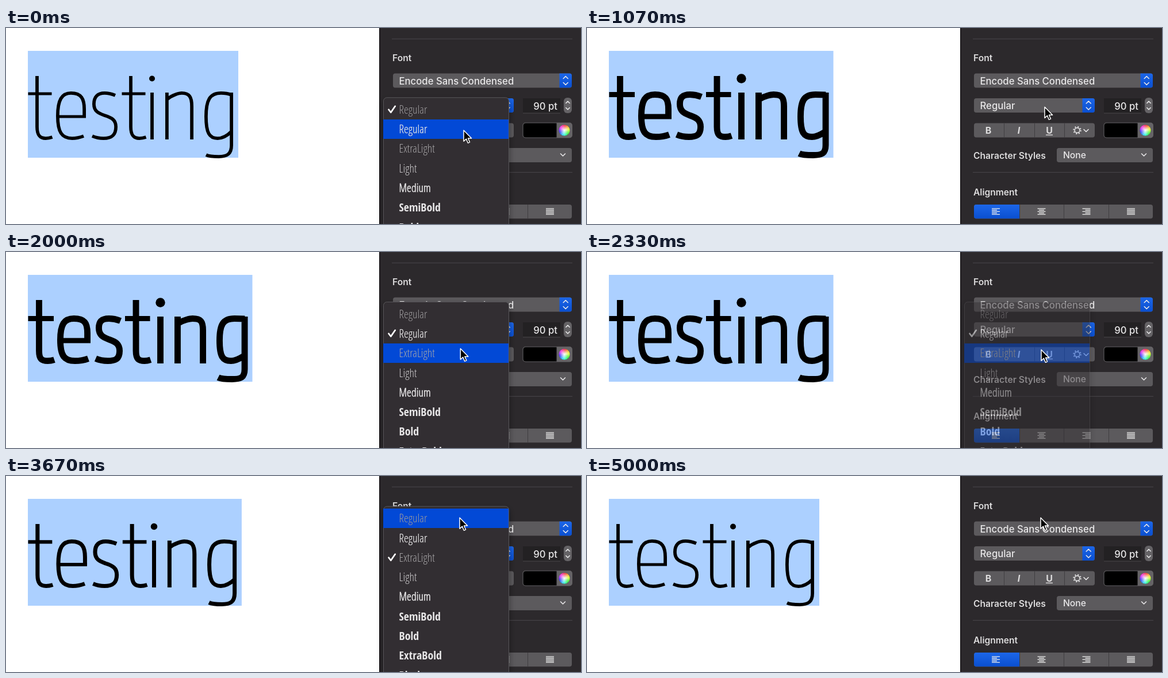
An HTML page that plays this animation: 1000x343 px, repeating every 5070 ms.

```html
<!DOCTYPE html>
<html lang="en">
<head>
<meta charset="utf-8">
<title>Font weight menu</title>
<style>
  html, body { margin: 0; width: 100%; height: 100%; overflow: hidden; background: #fff; }
  svg { display: block; width: 100%; height: 100%; }
  text { font-family: Inter, Roboto, sans-serif; font-size: 16.7px; font-weight: 500; fill: #e9e8e9; }
  .label { font-size: 15.6px; font-weight: 600; fill: #dddcdd; }
  .bold { font-size: 16px; font-weight: 700; text-anchor: middle; fill: #dddcdd; }
  .menu text { font-size: inherit; font-weight: inherit; fill: inherit; }
  .light text { font-family: "Open Sans Condensed Light", "Noto Sans", "Open Sans", sans-serif; font-stretch: 75%; }
  .heavy text { font-family: "Open Sans Condensed", "Open Sans", "Noto Sans", sans-serif; font-stretch: 75%; }
</style>
</head>
<body>
<svg id="stage" viewBox="0 0 1000 343" preserveAspectRatio="none">
  <defs>
    <linearGradient id="blue" x2="0" y2="1">
      <stop stop-color="#1c66e8"/><stop offset="1" stop-color="#0a4fd0"/>
    </linearGradient>
    <radialGradient id="glow">
      <stop stop-color="#fff"/><stop offset="1" stop-color="#fff" stop-opacity="0"/>
    </radialGradient>
    <filter id="shadow" x="-10%" y="-10%" width="120%" height="120%">
      <feDropShadow dx="0" dy="5" stdDeviation="6" flood-color="#000" flood-opacity=".4"/>
    </filter>
  </defs>
  <rect id="selection" x="38" y="40" height="187" fill="#acd0ff"/>
  <g id="word" role="img" aria-label="testing"><title>testing</title>
    <path id="letters" fill="none" stroke="#000"/>
    <path id="bars" fill="none" stroke="#000"/>
    <circle id="dot" cy="88.5"/>
  </g>
  <g id="panel"></g>
  <g id="menu" class="menu"></g>
  <path id="cursor" d="M0 0V19.2L4.4 15.1 7.4 22.2 10.5 20.9 7.5 14H13.6Z"
        fill="#000" stroke="#fff" stroke-width="1.5" stroke-linejoin="round"/>
</svg>
<script>
const $ = id => document.getElementById(id);
const LOOP = 5070, ROW = 34.3;
const GREY = '#5c5a5d', DARK = '#2c292c';

const rect = (x, y, w, h, fill, r = 0, extra = '') =>
  `<rect x="${x}" y="${y}" width="${w}" height="${h}" rx="${r}" fill="${fill}" ${extra}/>`;
const text = (x, y, s, extra = '') => `<text x="${x}" y="${y}" ${extra}>${s}</text>`;
const line = (d, width = 1.6, color = '#e9e8e9') =>
  `<path d="${d}" fill="none" stroke="${color}" stroke-width="${width}" stroke-linecap="round" stroke-linejoin="round"/>`;
const chevron = (x, y, dir, s = 4) => line(`M${x - s} ${y}l${s} ${s * dir}l${s} ${-s * dir}`);
const arrows = (x, y) => chevron(x, y - 3.5, -1) + chevron(x, y + 3.5, 1);

// Right-rounded blue end of a popup button
const blueCap = (x, y, w) =>
  `<path d="M${x} ${y}h${w - 4}q4 0 4 4v17q0 4-4 4h${4 - w}z" fill="url(#blue)"/>` + arrows(x + w / 2, y + 12.5);

const popup = (y, right) => rect(673, y, right - 673, 25, GREY, 4) + blueCap(right - 21.5, y, 21.5);

function alignIcon(cx, align) {
  return [0, 1, 2, 3, 4].map(i => {
    const w = i % 2 && align !== 'full' ? 9 : 14;
    const x = align === 'right' ? cx + 7 - w : align === 'center' ? cx - w / 2 : cx - 7;
    return rect(x, 315.5 + i * 2.5, w, 1.3, '#eee');
  }).join('');
}

// Hues run clockwise with red at the top
function colorWheel(cx, cy, r) {
  let s = '';
  const n = 18, at = a => `${cx + r * Math.cos(a)} ${cy + r * Math.sin(a)}`;
  for (let i = 0; i < n; i++) {
    const a = i / n * 2 * Math.PI, b = a + 2.1 * Math.PI / n;
    s += `<path d="M${cx} ${cy}L${at(a)}A${r} ${r} 0 0 1 ${at(b)}Z" fill="hsl(${90 + i * 360 / n} 95% 58%)"/>`;
  }
  return s + `<circle cx="${cx}" cy="${cy}" r="${r}" fill="url(#glow)"/>`;
}

function buildPanel() {
  const rule = y => rect(671, y, 314, 1.2, '#454246');
  const splits = (xs, y) => xs.map(x => rect(x, y, 1, 25, '#3f3d40')).join('');
  $('panel').innerHTML = [
    rect(649, 0, 351, 343, DARK), rect(649, 0, 1.5, 343, '#151315'),
    rule(18.5), rule(252),
    text(672, 58, 'Font', 'class="label"'),
    popup(79.5, 984), text(683.5, 98.5, 'Encode Sans Condensed'),
    popup(123, 883), text(683.5, 142, 'Regular', 'id="style"'),
    rect(899, 123, 65, 26, '#232123'), rect(899, 148.5, 65, 1, '#4a484b'),
    text(959, 142.5, '90 pt', 'text-anchor="end"'),
    rect(970, 122, 14, 27, '#656366', 6), chevron(977, 131.5, -1, 3.2), chevron(977, 139.5, 1, 3.2),
    rect(673, 166.5, 210, 25, GREY, 4), splits([725, 778, 830], 166.5),
    text(698, 185, 'B', 'class="bold"'),
    text(751, 185, 'I', 'class="bold" font-style="italic"'),
    text(804, 184.5, 'U', 'class="bold"'), rect(798, 186.5, 12, 1.4, '#dddcdd'),
    '<g fill="none" stroke="#dddcdd"><circle cx="852.5" cy="179" r="4.4" stroke-width="1.6"/>',
    '<circle cx="852.5" cy="179" r="6.2" stroke-width="2.2" stroke-dasharray="2 2.87"/></g>',
    chevron(868, 177.5, 1, 4),
    rect(898.5, 165.5, 86.5, 27, '#656366', 5),
    '<path d="M957.5 166.5H904q-4.5 0-4.5 4.5v16q0 4.5 4.5 4.5h53.5z" fill="#000"/>',
    colorWheel(971, 179, 9.5),
    text(672, 229, 'Character Styles', 'class="label"'),
    rect(817, 210, 167, 25, GREY, 4), text(828, 228, 'None', 'style="font-size:15.7px"'),
    chevron(968.5, 220, 1, 4),
    text(672, 293, 'Alignment', 'class="label"'),
    rect(673, 309, 311, 24.5, GREY, 4),
    '<path d="M752 309h-75q-4 0-4 4v16.5q0 4 4 4h75z" fill="url(#blue)"/>',
    splits([752, 829, 907], 309),
    alignIcon(711, 'left'), alignIcon(790.5, 'center'), alignIcon(868.5, 'right'), alignIcon(946, 'full')
  ].join('');
}

const items = [
  ['Regular', 100, '#9d9b9d'], ['Regular', 400, '#e6e5e6'], ['ExtraLight', 200, '#a9a7a9'],
  ['Light', 300, '#cfcdcf'], ['Medium', 500, '#e6e5e6'], ['SemiBold', 600, '#e6e5e6'],
  ['Bold', 700, '#e6e5e6'], ['ExtraBold', 800, '#e6e5e6'], ['Black', 900, '#e6e5e6']
];

function buildMenu() {
  const menu = $('menu');
  const row = ([name, weight, fill], i) => {
    const group = weight < 600 ? 'light' : 'heavy';
    const stroke = weight === 500 ? .6 : weight === 400 ? .25 : 0;
    return `<g class="${group}" font-size="20" font-weight="${weight}" fill="${fill}" stroke="${fill}" stroke-width="${stroke}">` +
      text(683.5, 28.6 + i * ROW, name) + '</g>';
  };
  menu.innerHTML = rect(656.5, .5, 218, 340, '#302e31', 6, 'stroke="#59575a" filter="url(#shadow)"') +
    rect(656, 0, 218, 34, '#0249d6', 0, 'id="hover" shape-rendering="crispEdges"') +
    items.map(row).join('') +
    `<g id="check">${line('M665.5 21.5l3.8 5 7.5-11', 2.7, '#fff')}</g>`;

  // Without a condensed cut the names need a smaller size
  for (const group of ['light', 'heavy']) {
    const rows = [...menu.querySelectorAll('.' + group)];
    const perLetter = rows[0].firstChild.getComputedTextLength() / rows[0].textContent.length;
    if (perLetter > (group === 'light' ? 8.8 : 10.3)) rows.forEach(g => g.setAttribute('font-size', 16.6));
  }
}

const mix = (a, b, k) => a + (b - a) * k;

// Draws the word at weight k: 0 is thin, 1 is regular
function drawWord(k) {
  const w = mix(5.8, 10.9, k), h = w / 2, T = 111 + h, B = 196 - h, D = 228 - h;
  const span = (l0, r0, l1, r1) => {
    const L = mix(l0, l1, k), R = mix(r0, r1, k);
    return { L, R, l: L + h, r: R - h, c: (L + R) / 2 };
  };
  const bar = mix(115, 116.5, k);
  let d = '', bars = '';

  for (const g of [span(38.5, 80.5, 38.5, 84), span(201.5, 243.5, 207, 251.5)]) {
    const s = g.L + mix(15.5, 19, k);
    d += `M${s} 84V173C${s} 188 ${s + 5} ${B} ${s + 15} ${B}Q${g.R - 6} ${B} ${g.R} ${B - 2}`;
    bars += `M${g.L} ${bar}H${g.R - 1}`;
  }

  const e = span(87, 139, 89, 147);
  d += `M${e.R - 4} ${B - 4}C${e.R - 12} ${B - 1} ${e.c + 8} ${B} ${e.c + 2} ${B}` +
    `C${e.l + 7} ${B} ${e.l} 182 ${e.l} 154C${e.l} 126 ${e.l + 7} ${T} ${e.c} ${T}` +
    `C${e.r - 5} ${T} ${e.r} 124 ${e.r} 142V156`;
  bars += `M${e.l} 155H${e.R}`;

  const s = span(149, 194, 155, 203);
  d += `M${s.R - 4} ${T + 4}C${s.R - 14} ${T} ${s.c + 4} ${T} ${s.c} ${T}` +
    `C${s.l + 7} ${T} ${s.l + 1} 121 ${s.l + 1} 133C${s.l + 1} 146 ${s.l + 9} 149 ${s.c} 153` +
    `C${s.r - 7} 157 ${s.r} 161 ${s.r} 173C${s.r} 188 ${s.r - 8} ${B} ${s.c - 2} ${B}` +
    `C${s.c - 8} ${B} ${s.L + 8} ${B - 1} ${s.L + 1} ${B - 4}`;

  const i = mix(254, 268.5, k);
  d += `M${i} 113V195`;

  const n = span(277, 326, 293, 348);
  d += `M${n.l} 113V195M${n.l} 125C${n.l + 9} ${T + 3} ${n.c} ${T} ${n.c + 4} ${T}` +
    `C${n.r - 4} ${T} ${n.r} 121 ${n.r} 137V195`;

  const g = span(345, 395, 366, 420.5);
  d += `M${g.r} 113V205C${g.r} 220 ${g.r - 7} ${D} ${g.c} ${D}` +
    `C${g.c - 6} ${D} ${g.L + 9} ${D} ${g.L + 3} ${D - 3}` +
    `M${g.r} 117C${g.r - 8} ${T} ${g.c + 8} ${T} ${g.c + 4} ${T}` +
    `C${g.l + 6} ${T} ${g.l} 127 ${g.l} 155C${g.l} 184 ${g.l + 6} ${B} ${g.c - 2} ${B}` +
    `C${g.c + 8} ${B} ${g.r - 6} ${B - 6} ${g.r} 181`;

  $('letters').setAttribute('d', d);
  $('letters').setAttribute('stroke-width', w);
  $('bars').setAttribute('d', bars);
  $('bars').setAttribute('stroke-width', mix(5.2, 8.8, k));
  $('dot').setAttribute('cx', i);
  $('dot').setAttribute('r', mix(5, 8.2, k));
  $('selection').setAttribute('width', mix(366, 390.5, k));
}

// Menu openings: start, fade start, checked row
const openings = [[0, 570, 0], [1330, 2230, 1], [3070, 4170, 2]];
const FADE = 200;
// Word changes: time, weight, style name
const styles = [[0, 0, 'Regular'], [840, 1, 'Regular'], [2470, .24, 'ExtraLight'], [4400, 0, 'Regular']];
// Pointer tip: time, x, y
const path = [
  [0, 796, 179], [500, 796, 180], [800, 796, 180], [1150, 796, 132], [1700, 796, 132], [2050, 790, 171],
  [2500, 790, 171], [2850, 798, 133], [3270, 798, 133], [3620, 789, 73], [LOOP, 789, 73]
];

function pointer(t) {
  const i = path.findIndex(p => p[0] > t), a = path[i - 1], b = path[i];
  const u = (t - a[0]) / (b[0] - a[0]), k = u * u * (3 - 2 * u);
  return [mix(a[1], b[1], k), mix(a[2], b[2], k)];
}

let shown;
function render(t) {
  const style = styles.filter(s => s[0] <= t).pop();
  if (style !== shown) {
    shown = style;
    drawWord(style[1]);
    $('style').textContent = style[2];
  }

  const [x, y] = pointer(t);
  $('cursor').setAttribute('transform', `translate(${x} ${y})`);

  const open = openings.find(o => t >= o[0] && t < o[1] + FADE);
  $('menu').setAttribute('visibility', open ? 'visible' : 'hidden');
  if (open) {
    const [, end, checked] = open, top = 121.3 - checked * ROW;
    const row = Math.floor((y - top - 4.4) / ROW);
    $('menu').setAttribute('transform', `translate(0 ${top})`);
    $('menu').setAttribute('opacity', 1 - Math.max(0, t - end) / FADE);
    $('hover').setAttribute('y', 4.4 + row * ROW);
    $('check').setAttribute('transform', `translate(0 ${checked * ROW})`);
  }
}

buildPanel();
buildMenu();
const start = performance.now();
function tick() {
  render((performance.now() - start) % LOOP);
  requestAnimationFrame(tick);
}
tick();
</script>
</body>
</html>
```
